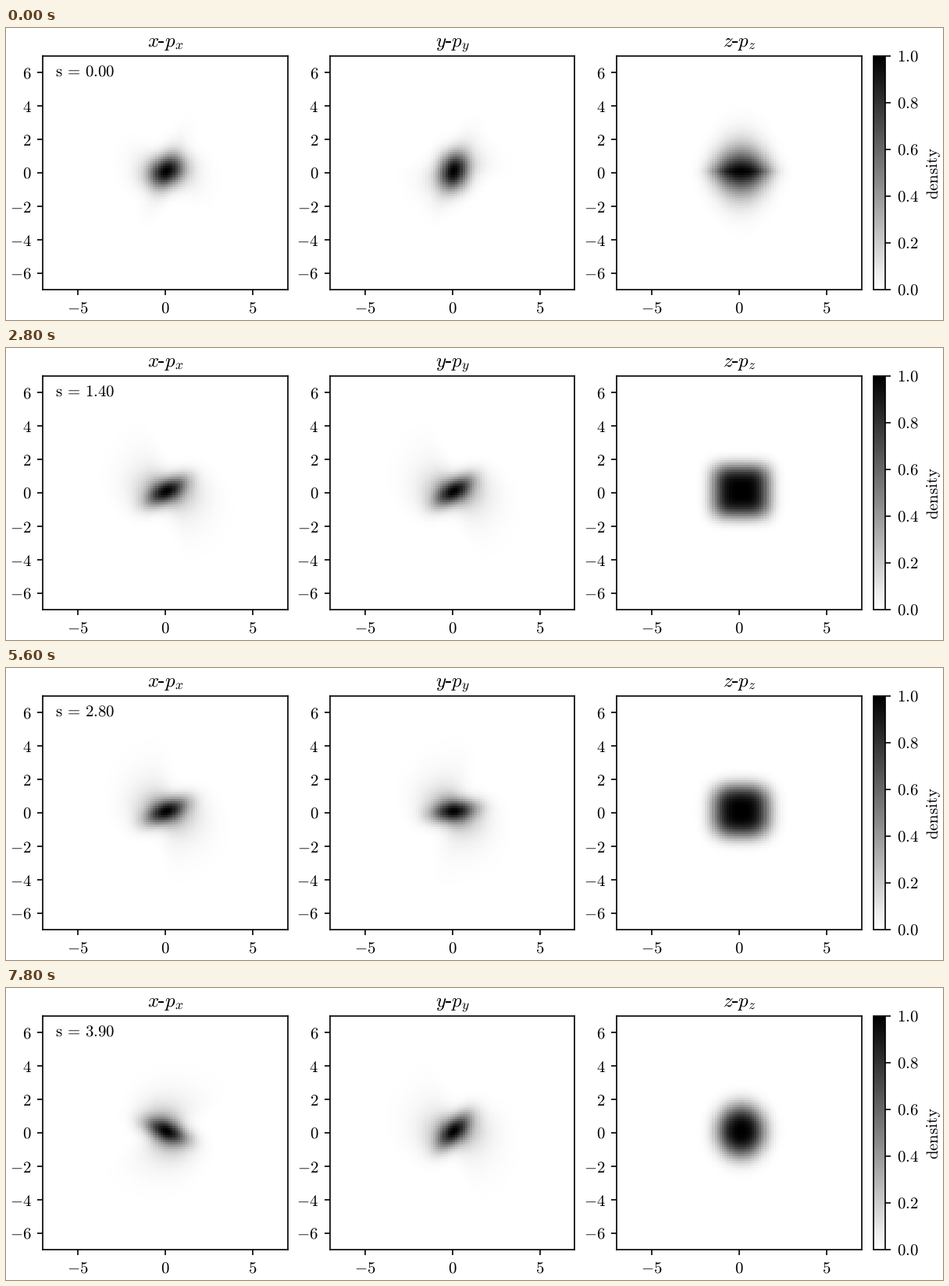
A matplotlib script for the animation above (8000 ms loop, 1200 by 375 pixels).

```python
import matplotlib.pyplot as plt
import numpy as np
from matplotlib.animation import FuncAnimation
from matplotlib.patches import Rectangle

W, H, DPI = 1200, 375, 150
FRAMES, INTERVAL = 40, 200
LIM, BINS = 7, 100
LEFT, TOP, BOTTOM, PANEL_W, PITCH = 47.2, 36, 336, 313.6, 367.5
END = 3.9

plt.rcParams.update({
    "mathtext.fontset": "cm",
    "font.size": 10,
    "axes.titlesize": 12,
    "text.hinting": "none",
})

edges = np.linspace(-LIM, LIM, BINS + 1)
centers = (edges[1:] + edges[:-1]) / 2
Q, P = np.meshgrid(centers - 0.07, centers - 0.1)


def lobe(angle, length, width, power=2):
    a = np.radians(angle)
    u = Q * np.cos(a) + P * np.sin(a)
    v = P * np.cos(a) - Q * np.sin(a)
    return np.exp(-np.abs(u / length) ** power - (v / width) ** 2)


def transverse(s, core):
    """Core lobe at the given angle, trailed by a fan of longer, fainter ones."""
    start = np.exp(-3 * s)
    length, width = 1.45 - 0.3 * start, 0.56 + 0.26 * start
    reach, lag = 3.1 - 0.9 * start, 95 + 6 * s
    fan = np.linspace(0, 1, 11)
    weights = np.exp(-1.2 * fan)
    halo = sum(
        w * lobe(core - t * lag, length + t * (reach - length), 0.85 - 0.25 * t)
        for w, t in zip(weights / weights.sum(), fan)
    )
    arm = 0.12 * np.exp(-4 * s) * lobe(68, 2, 0.6)
    return 0.47 * lobe(core, length, width, 2.6) + 0.53 * halo + arm


def density_x(s):
    """Settles, rests, then turns clockwise ever faster."""
    return transverse(s, 34 + 16 * np.exp(-3 * s) - 58 * np.exp(2 * (s - END)))


def density_y(s):
    """Turns steadily, with a sharp swing near the end."""
    return transverse(
        s, 64 - 19 * s + 31 * np.exp(-4 * s) - 120 * np.exp(5.4 * (s - END)))


def density_z(s):
    """Lens that swells into a soft box, rounds off and is briefly squeezed."""
    start = np.exp(-4 * s)
    squeeze = np.exp(-((s - 3.68) / 0.12) ** 2)
    boxiness = 2 + 2.2 * np.exp(-((s - 1.9) / 0.9) ** 2)
    falloff = 1 + min(0.4, 0.15 * (s - 1.6) ** 2)
    a = 1.64 - 0.28 * np.exp(6 * (s - END))
    b = 1.58 - 0.25 * start - 0.33 * squeeze
    radius = (np.abs((Q - 0.04) / a) ** boxiness
              + np.abs(P / b) ** (boxiness - 0.9 * start))
    return np.exp(-radius ** falloff) + 0.05 * squeeze * lobe(90, 2.4, 1.1)


def roman(text):
    return rf"$\mathrm{{{text}}}$"


def counter(s):
    return rf"$\mathrm{{s\hspace{{0.18}}=\hspace{{0.18}}{s:.2f}}}$"


def pixel_axes(left, width):
    return fig.add_axes([left / W, 1 - BOTTOM / H, width / W, (BOTTOM - TOP) / H])


def add_panel(index, name, hyphen_x):
    ax = pixel_axes(LEFT + index * PITCH, PANEL_W)
    image = ax.imshow(
        np.zeros((BINS, BINS)), cmap="gray_r", vmin=0, vmax=1, origin="lower",
        extent=(-LIM, LIM, -LIM, LIM), aspect="auto", interpolation="nearest",
    )
    xticks, yticks = range(-5, 6, 5), range(-6, 7, 2)
    ax.set_xticks(xticks, [roman(v) for v in xticks])
    ax.set_yticks(yticks, [roman(v) for v in yticks])
    ax.set_title(rf"${name}\hspace{{0.38}}p_{name}$")
    # Short text hyphen between the two symbols
    fig.add_artist(Rectangle((hyphen_x / W, 1 - 18.8 / H), 6.6 / W, 1.5 / H,
                             color="black", lw=0))
    return ax, image


fig = plt.figure(figsize=(W / DPI, H / DPI), dpi=DPI, facecolor="white")
panels = [
    add_panel(i, name, hyphen)
    for i, (name, hyphen) in enumerate([("x", 195.3), ("y", 562.9), ("z", 930.3)])
]
images = [image for _, image in panels]
first = panels[0][0]
label = first.text(0.05, 0.91, counter(0), transform=first.transAxes)

bar = fig.colorbar(images[0], cax=pixel_axes(1111, 15))
levels = np.linspace(0, 1, 6)
bar.set_ticks(levels, labels=[roman(f"{v:.1f}") for v in levels])
bar.set_label(roman("density"))


def update(frame):
    s = frame / 10
    for image, density in zip(images, (density_x, density_y, density_z)):
        d = density(s)
        image.set_data(d / d.max())
    label.set_text(counter(s))
    return [*images, label]


anim = FuncAnimation(fig, update, frames=FRAMES, interval=INTERVAL, repeat=True)
plt.show()
```
